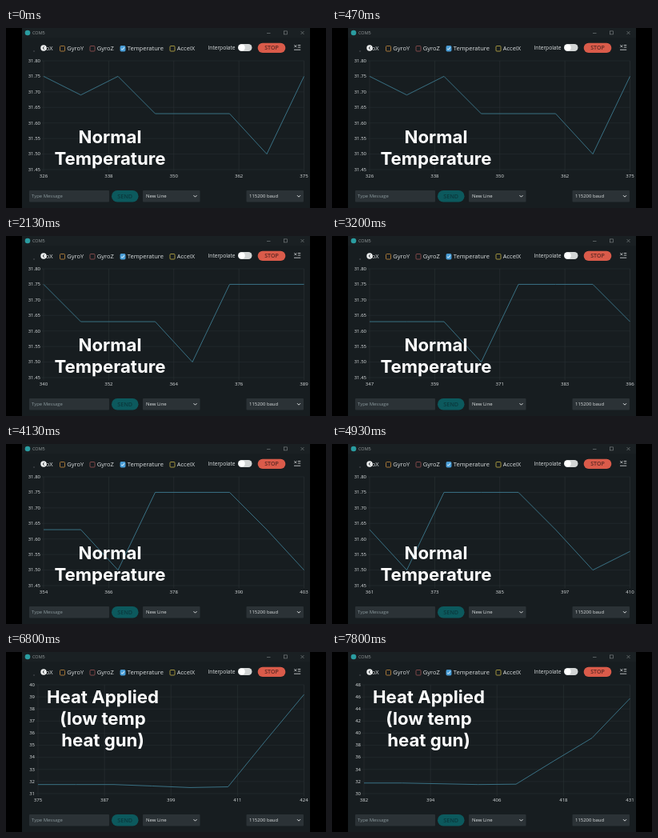
An HTML page with a canvas that plays this animation: 400x225 px, repeating every 8 s.

```html
<!DOCTYPE html>
<html lang="en">
<head>
<meta charset="utf-8">
<title>Serial plotter</title>
<style>
html, body { margin: 0; width: 100%; height: 100%; overflow: hidden; background: #000; }
canvas { display: block; width: 100vw; height: 100vh; }
</style>
</head>
<body>
<canvas id="stage"></canvas>
<script>
const W = 400, H = 225, LOOP = 8000;
const FIRST_UPDATE = 800, UPDATE_EVERY = 1000, CAPTION_CUT = 5467;
const STRIDE = 7, VISIBLE = 8, START = 326;
const TOP = 41, BOTTOM = 177, RIGHT = 372.5;
const BG = '#171d20', FIELD = '#2b3236', TEXT = '#dde1e2', DIM = '#858b8d';
const UI = '"Open Sans", sans-serif';

// One reading for every STRIDE samples, beginning at START.
const readings = [31.75, 31.69, 31.75, 31.63, 31.63, 31.63, 31.5, 31.75,
  31.75, 31.75, 31.63, 31.5, 31.56, 35.42, 39.2, 45.75];

const canvas = document.getElementById('stage');
const ctx = canvas.getContext('2d');

function label(text, x, y, size, color = TEXT, align = 'left', weight = 400, family = UI) {
  ctx.font = `${weight} ${size}px ${family}`;
  ctx.textAlign = align;
  ctx.fillStyle = color;
  ctx.fillText(text, x, y);
}

function box(x, y, w, h, r, color) {
  ctx.fillStyle = color;
  ctx.beginPath();
  ctx.roundRect(x, y, w, h, r);
  ctx.fill();
}

function stroke(points, color, width = 1) {
  ctx.strokeStyle = color;
  ctx.lineWidth = width;
  ctx.beginPath();
  points.forEach(([x, y]) => ctx.lineTo(x, y));
  ctx.stroke();
}

function cross(x, y, r, color, width) {
  stroke([[x - r, y - r], [x + r, y + r]], color, width);
  stroke([[x + r, y - r], [x - r, y + r]], color, width);
}

function checkbox(x, name, color, checked) {
  ctx.strokeStyle = color;
  ctx.lineWidth = 0.9;
  ctx.beginPath();
  ctx.roundRect(x + 0.5, 22.5, 6, 6.5, 1);
  if (checked) {
    ctx.fillStyle = color;
    ctx.fill();
  }
  ctx.stroke();
  if (checked) stroke([[x + 1.7, 25.8], [x + 3, 27.2], [x + 5.4, 24.2]], '#fff');
  label(name, x + 9.3, 27.5, 7.5);
}

function titleBar() {
  box(20, 0, 360, 12, 0, '#1a2023');
  box(23.7, 2.7, 6.6, 6.6, 3.3, '#2a9ca0');
  label('COM5', 33, 8.1, 5.5, '#969c9e');
  stroke([[326, 6.5], [330.5, 6.5]], DIM, 0.6);
  ctx.strokeRect(347.3, 3.9, 4, 4);
  cross(370.5, 6, 2, DIM, 0.6);
}

function toolbar() {
  label('oX', 49.7, 27.5, 7.5);
  box(34.5, 28.5, 1, 1, 0, '#7b8183');
  box(43.3, 21.3, 7.4, 7.4, 3.7, '#eef0f0');
  stroke([[47.8, 23.4], [46.1, 25], [47.8, 26.6]], BG);

  checkbox(67, 'GyroY', '#b5803a');
  checkbox(104.5, 'GyroZ', '#8c4c4c');
  checkbox(142.5, 'Temperature', '#4a9fd8', true);
  checkbox(204.5, 'AccelX', '#b0a042');

  label('Interpolate', 252.5, 27.2, 6.6);
  box(290, 20, 17.5, 9, 4.5, '#d2d5d5');
  box(290.5, 20.4, 8.2, 8.2, 4.1, '#fff');
  box(314.7, 18.7, 34.6, 12.3, 6, '#da5b4a');
  label('STOP', 332, 27.4, 7, '#5a2722', 'center', 600);

  cross(361.8, 22.7, 1.5, TEXT, 0.8);
  stroke([[364.8, 21.5], [368.2, 21.5]], TEXT, 0.8);
  stroke([[364.8, 24], [368.2, 24]], TEXT, 0.8);
  stroke([[360, 27.2], [368.2, 27.2]], TEXT, 0.8);
}

function chevron(x) {
  stroke([[x - 2, 209.2], [x, 211.2], [x + 2, 209.2]], TEXT);
}

function footer() {
  box(29, 203, 100, 14.5, 1, FIELD);
  label('Type Message', 32, 212.4, 5.95, '#89979b');
  box(132, 203, 33.5, 14.5, 7.25, '#0c595d');
  label('SEND', 148.7, 212.8, 7.2, '#0b383c', 'center', 600);
  box(171, 203, 71.5, 14.5, 1, FIELD);
  label('New Line', 175, 212.3, 6);
  chevron(236.5);
  box(300.5, 203, 71.5, 14.5, 1, FIELD);
  label('115200 baud', 304, 212.3, 5.95);
  chevron(366);
}

// Pads the data by 5 % and rounds outwards to a 1-2-5 tick step.
function niceAxis(values) {
  const low = Math.min(...values), high = Math.max(...values);
  const pad = (high - low) * 0.05;
  const rough = (high - low + 2 * pad) / 10;
  const power = 10 ** Math.floor(Math.log10(rough));
  const step = [1, 2, 5, 10].find(m => m * power >= rough) * power;
  const min = Math.floor((low - pad) / step) * step;
  const max = Math.ceil((high + pad) / step) * step;
  const digits = step < 0.1 ? 2 : step < 1 ? 1 : 0;
  return { min, max, step, digits, count: Math.round((max - min) / step) };
}

function chart(offset) {
  const values = readings.slice(offset, offset + VISIBLE);
  const axis = niceAxis(values);
  const left = [40, 44, 47][axis.digits];
  const xAt = f => left + f * (RIGHT - left);
  const yAt = v => BOTTOM - (v - axis.min) / (axis.max - axis.min) * (BOTTOM - TOP);

  for (let i = 0; i <= axis.count; i++) {
    const value = axis.min + i * axis.step;
    const y = yAt(value);
    stroke([[left - 3, y], [RIGHT, y]], '#242b2e', 0.7);
    label(value.toFixed(axis.digits), left - 4, y + 1.8, 6, TEXT, 'right', 500);
  }
  const first = START + offset * STRIDE;
  const span = STRIDE * (VISIBLE - 1);
  for (let i = 0; i <= 4; i++) {
    const x = xAt(i / 4);
    stroke([[x, TOP], [x, BOTTOM + 3]], '#293033', 0.7);
    label(Math.floor(first + span * i / 4), x, 186.5, 6, TEXT, 'center', 500);
  }
  stroke(values.map((v, i) => [xAt(i / (VISIBLE - 1)), yAt(v)]), '#3c7589', 0.95);
}

function caption(lines, x, y) {
  lines.forEach((line, i) =>
    label(line, x, y + i * 27, 22.2, '#fff', 'center', 700, 'Inter, sans-serif'));
}

function draw(t) {
  const scale = window.devicePixelRatio || 1;
  const w = Math.round(innerWidth * scale), h = Math.round(innerHeight * scale);
  if (canvas.width !== w || canvas.height !== h) {
    canvas.width = w;
    canvas.height = h;
  }
  ctx.setTransform(w / W, 0, 0, h / H, 0, 0);
  box(0, 0, W, H, 0, '#000');
  box(20, 0, 360, H, 0, BG);
  titleBar();
  toolbar();
  chart(Math.max(0, Math.floor((t - FIRST_UPDATE) / UPDATE_EVERY) + 1));
  footer();
  if (t < CAPTION_CUT) caption(['Normal', 'Temperature'], 130, 143.7);
  else caption(['Heat Applied', '(low temp', 'heat gun)'], 121, 63.7);
}

const begin = performance.now();
function tick() {
  draw((performance.now() - begin) % LOOP);
  requestAnimationFrame(tick);
}
tick();
</script>
</body>
</html>
```
